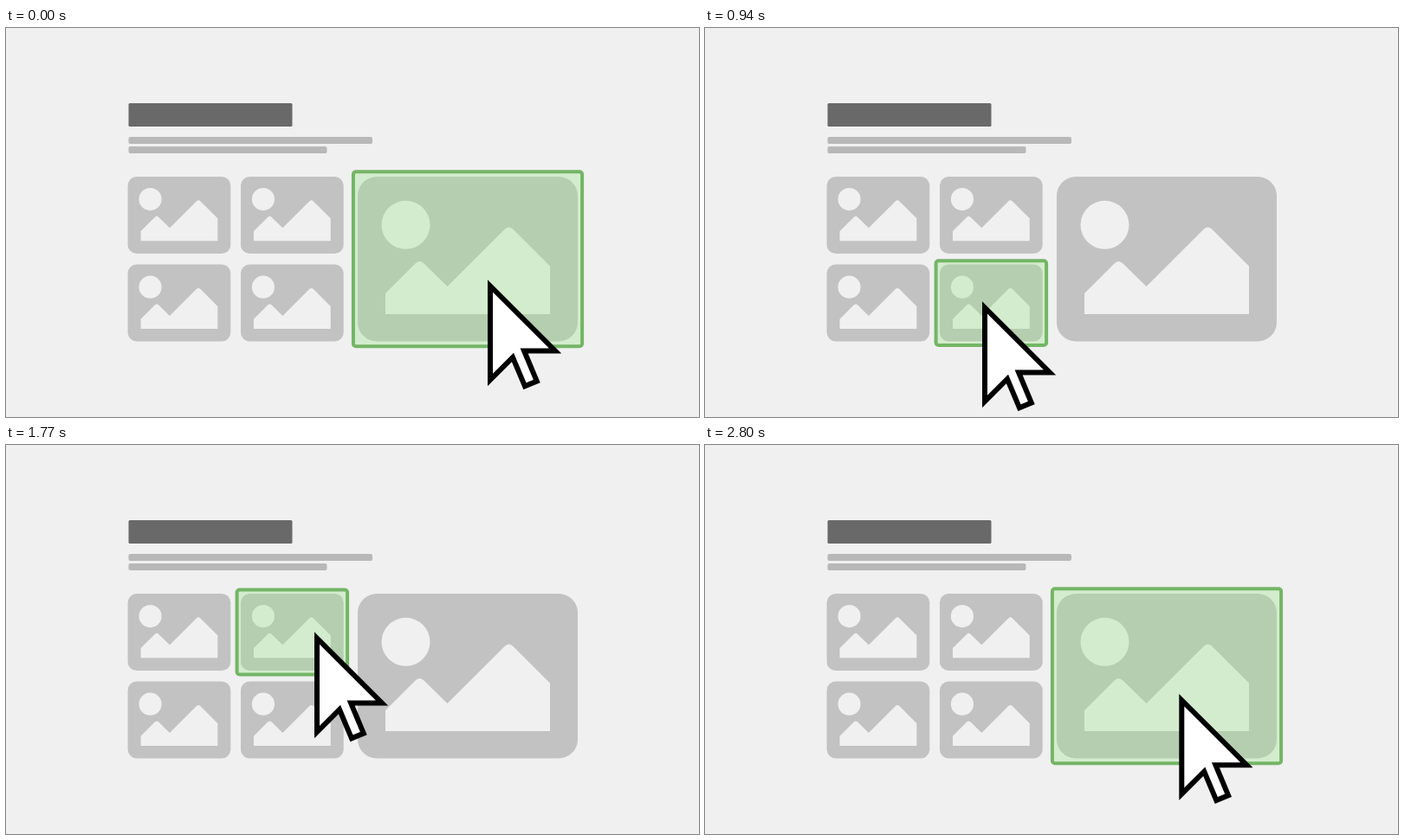
An HTML page for the animation above (2830 ms loop, 800x450 px).

```html
<!DOCTYPE html>
<html lang="en">
<head>
<meta charset="utf-8">
<title>Gallery hover</title>
<style>
  html, body { margin: 0; width: 100%; height: 100%; overflow: hidden; background: #f0f0f0; }
  svg { display: block; width: 100%; height: 100%; }
</style>
</head>
<body>
<svg viewBox="0 0 800 450">
  <defs>
    <g id="card">
      <rect width="254" height="190.5" rx="22" fill="#c2c2c2"/>
      <g fill="#f0f0f0">
        <circle cx="55.5" cy="55.8" r="28"/>
        <path d="M32 159V135L66.5 100.5Q71.5 95.5 76.5 100.5L103.5 127L169.5 61Q174.5 56 179.5 61L222 103.5V159Z"/>
      </g>
    </g>
  </defs>
  <rect width="800" height="450" fill="#f0f0f0"/>
  <rect x="141.5" y="87" width="189" height="27" rx="1.5" fill="#696969"/>
  <g fill="#b8b8b8">
    <rect x="141.5" y="126" width="281.5" height="8" rx="2"/>
    <rect x="141.5" y="137" width="229" height="8" rx="2"/>
  </g>
  <g id="cards"></g>
  <rect id="glow" rx="3" fill="rgb(155,228,137)" fill-opacity=".34" stroke="#74b566" stroke-width="4"/>
  <path id="cursor" d="M3 7.5V116L29 90L43 123.3L56.8 117.6L42.1 82.5H78Z" fill="#fff" stroke="#000" stroke-width="6"/>
</svg>
<script>
const LOOP = 2830, STEP = 30;
const W = 254, H = 190.5, SMALL = 1 / 2.14;

const big = { x: 406, y: 172, scale: 1, padX: 5.1, padY: 5.8 };
const small = (x, y) => ({ x, y, scale: SMALL, padX: 4.4, padY: 4.4 });
const cards = [
  small(140.6, 172), small(271, 172),
  small(140.6, 273.6), small(271, 273.6),
  big
];

// Cursor tip travels in straight lines: start time, step count, from, to
const moves = [
  { start: 340, steps: 20, from: [556, 291], to: [320, 316] },
  { start: 1410, steps: 12, from: [320, 316], to: [356, 216] },
  { start: 2140, steps: 23, from: [356, 216], to: [556, 291] }
];

const glow = document.getElementById('glow');
const cursor = document.getElementById('cursor');

document.getElementById('cards').innerHTML = cards.map(c =>
  `<use href="#card" transform="translate(${c.x} ${c.y}) scale(${c.scale})"/>`).join('');

function tipAt(t) {
  const move = moves.filter(m => t >= m.start).pop() || moves[0];
  const n = Math.floor((t - move.start) / STEP);
  const k = Math.max(0, Math.min(1, n / move.steps));
  return move.from.map((v, i) => v + (move.to[i] - v) * k);
}

function isOver(c, x, y) {
  return x >= c.x && x <= c.x + W * c.scale && y >= c.y && y <= c.y + H * c.scale;
}

function setAttrs(el, attrs) {
  for (const name in attrs) el.setAttribute(name, attrs[name]);
}

function draw(t) {
  const [x, y] = tipAt(t);
  const hit = cards.find(c => isOver(c, x, y));
  cursor.setAttribute('transform', `translate(${x} ${y})`);
  glow.setAttribute('visibility', hit ? 'visible' : 'hidden');
  if (hit) setAttrs(glow, {
    x: hit.x - hit.padX,
    y: hit.y - hit.padY,
    width: W * hit.scale + 2 * hit.padX,
    height: H * hit.scale + 2 * hit.padY
  });
}

const begin = performance.now();
function tick() {
  draw((performance.now() - begin) % LOOP);
  requestAnimationFrame(tick);
}
tick();
</script>
</body>
</html>
```
